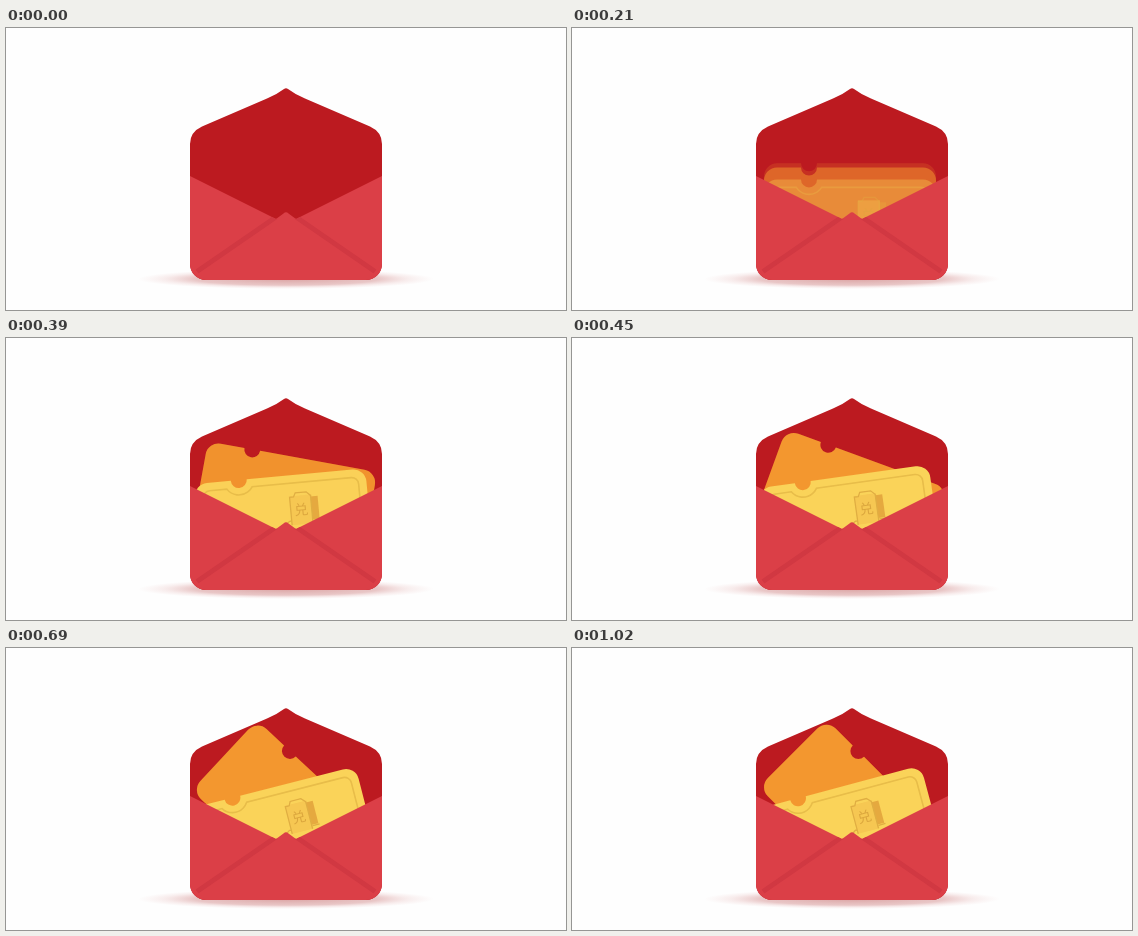
Recreate the animation shown at these times as an HTML page with a canvas. Size 560 by 282 pixels, loop 1050 ms.

```html
<!DOCTYPE html>
<html lang="en">
<head>
<meta charset="utf-8">
<title>Envelope with tickets</title>
<style>
html, body { margin: 0; width: 100%; height: 100%; overflow: hidden; background: #fefefe; }
canvas { display: block; width: 560px; height: 282px; }
</style>
</head>
<body>
<canvas id="stage" width="560" height="282"></canvas>
<script>
const ctx = document.getElementById('stage').getContext('2d');
const LOOP = 1050, STEP = 30;
const W = 172, H = 96, NOTCH_X = -41;

const clamp = v => Math.min(1, Math.max(0, v));
const span = (t, from, to) => clamp((t - from) / (to - from));
const easeOut = p => 1 - (1 - p) * (1 - p);
const mix = (a, b, p) => a + (b - a) * p;

function shadow() {
  ctx.save();
  ctx.translate(280, 251);
  ctx.scale(148, 10);
  const g = ctx.createRadialGradient(0, 0, 0, 0, 0, 1);
  g.addColorStop(0, 'rgba(190,90,90,.55)');
  g.addColorStop(0.62, 'rgba(195,100,100,.36)');
  g.addColorStop(0.82, 'rgba(210,130,130,.14)');
  g.addColorStop(1, 'rgba(220,150,150,0)');
  ctx.fillStyle = g;
  ctx.fillRect(-1, -1, 2, 2);
  ctx.restore();
}

function backPath() {
  const p = new Path2D();
  p.moveTo(278, 61);
  p.quadraticCurveTo(280, 59.5, 282, 61);
  p.quadraticCurveTo(290, 67, 299, 70.5);
  p.lineTo(364, 98.5);
  p.quadraticCurveTo(376, 104, 376, 116);
  p.lineTo(376, 236);
  p.arcTo(376, 252, 360, 252, 16);
  p.lineTo(200, 252);
  p.arcTo(184, 252, 184, 236, 16);
  p.lineTo(184, 116);
  p.quadraticCurveTo(184, 104, 196, 98.5);
  p.lineTo(261, 70.5);
  p.quadraticCurveTo(270, 67, 278, 61);
  p.closePath();
  return p;
}

function frontPath() {
  const p = new Path2D();
  p.moveTo(184, 148);
  p.lineTo(270, 191);
  p.lineTo(277.5, 185.4);
  p.quadraticCurveTo(280, 183.2, 282.5, 185.4);
  p.lineTo(290, 191);
  p.lineTo(376, 148);
  p.lineTo(376, 236);
  p.arcTo(376, 252, 360, 252, 16);
  p.lineTo(200, 252);
  p.arcTo(184, 252, 184, 236, 16);
  p.closePath();
  return p;
}

// Ticket outline around its own centre, with a bite in the top edge
function ticketPath(inset, radius, bite) {
  const x = W / 2 - inset, y = H / 2 - inset;
  const half = Math.sqrt(Math.max(0, bite * bite - inset * inset));
  const a = Math.asin(inset / bite);
  const p = new Path2D();
  p.moveTo(-x + radius, -y);
  p.lineTo(NOTCH_X - half, -y);
  p.arc(NOTCH_X, -H / 2, bite, Math.PI - a, a, true);
  p.lineTo(x - radius, -y);
  p.arcTo(x, -y, x, y, radius);
  p.arcTo(x, y, -x, y, radius);
  p.arcTo(-x, y, -x, -y, radius);
  p.arcTo(-x, -y, x, -y, radius);
  p.closePath();
  return p;
}

const back = backPath(), front = frontPath();
const ticket = ticketPath(0, 13, 8), frame = ticketPath(8, 7, 15);

function place(x, y, deg, alpha, draw) {
  ctx.save();
  ctx.translate(x, y);
  ctx.rotate(deg * Math.PI / 180);
  ctx.globalAlpha = alpha;
  draw();
  ctx.restore();
}

function orangeTicket() {
  ctx.fillStyle = '#f3972f';
  ctx.fill(ticket);
}

function yellowTicket() {
  ctx.fillStyle = '#fad359';
  ctx.fill(ticket);
  ctx.strokeStyle = '#e8bd49';
  ctx.lineWidth = 1.6;
  ctx.stroke(frame);

  // Small voucher box
  ctx.fillStyle = '#f6c752';
  ctx.fillRect(8, -27, 22, 29);
  ctx.fillStyle = '#e5a93f';
  ctx.fillRect(29, -25, 7, 23);
  ctx.strokeStyle = '#e0ae42';
  ctx.lineWidth = 1.3;
  ctx.beginPath();
  ctx.moveTo(8, 2);
  ctx.lineTo(8, -26);
  ctx.lineTo(12, -26);
  ctx.lineTo(14, -30);
  ctx.lineTo(25, -30);
  ctx.lineTo(29, -26);
  ctx.lineTo(29, 2);
  ctx.moveTo(2, 2);
  ctx.quadraticCurveTo(5, -3, 8, -2);
  ctx.moveTo(30, -1);
  ctx.lineTo(37, -1);
  ctx.stroke();
  ctx.fillStyle = '#dba63d';
  ctx.font = '14px "Noto Sans CJK SC", "Noto Sans CJK", sans-serif';
  ctx.textAlign = 'center';
  ctx.textBaseline = 'middle';
  ctx.fillText('兑', 18.5, -13);
}

function tickets(t) {
  const turn = easeOut(span(t, 335, 785));
  const ox = mix(278, 281.4, turn) - 2 * span(t, 330, 450) * (1 - turn);
  const oy = Math.max(166, 210 - 0.127 * t);
  const angle = 45 * turn;
  const lag = 7 * (1 - span(t, 150, 300));
  const body = 0.52 * span(t, 20, 150) + 0.03 * span(t, 150, 300) + 0.45 * span(t, 300, 400);
  place(ox, oy, angle, 0.18 * span(t, 0, 90), orangeTicket);
  place(ox, oy + lag, angle, body, orangeTicket);

  const tilt = -15 * easeOut(span(t, 292, 794));
  const yy = Math.max(186, 207 - 0.127 * (t - 150));
  const fade = 0.82 * span(t, 150, 300) + 0.18 * span(t, 300, 400);
  place(278, yy, tilt, fade, yellowTicket);
}

function envelopeFront() {
  ctx.fillStyle = '#db3f47';
  ctx.fill(front);
  ctx.save();
  ctx.clip(front);
  ctx.strokeStyle = '#d13842';
  ctx.lineWidth = 5;
  for (const side of [-1, 1]) {
    ctx.beginPath();
    ctx.moveTo(280 + side * 10, 189);
    ctx.lineTo(280 + side * 89, 243.5);
    ctx.stroke();
  }
  ctx.restore();
}

function draw(t) {
  ctx.fillStyle = '#fefefe';
  ctx.fillRect(0, 0, 560, 282);
  shadow();
  ctx.fillStyle = '#bc1a20';
  ctx.fill(back);
  ctx.save();
  ctx.clip(back);
  tickets(t);
  ctx.restore();
  envelopeFront();
}

let start = null;
function tick(now) {
  if (start === null) start = now;
  const t = (now - start) % LOOP;
  draw(Math.floor(t / STEP) * STEP);
  requestAnimationFrame(tick);
}
draw(0);
requestAnimationFrame(tick);
</script>
</body>
</html>
```
